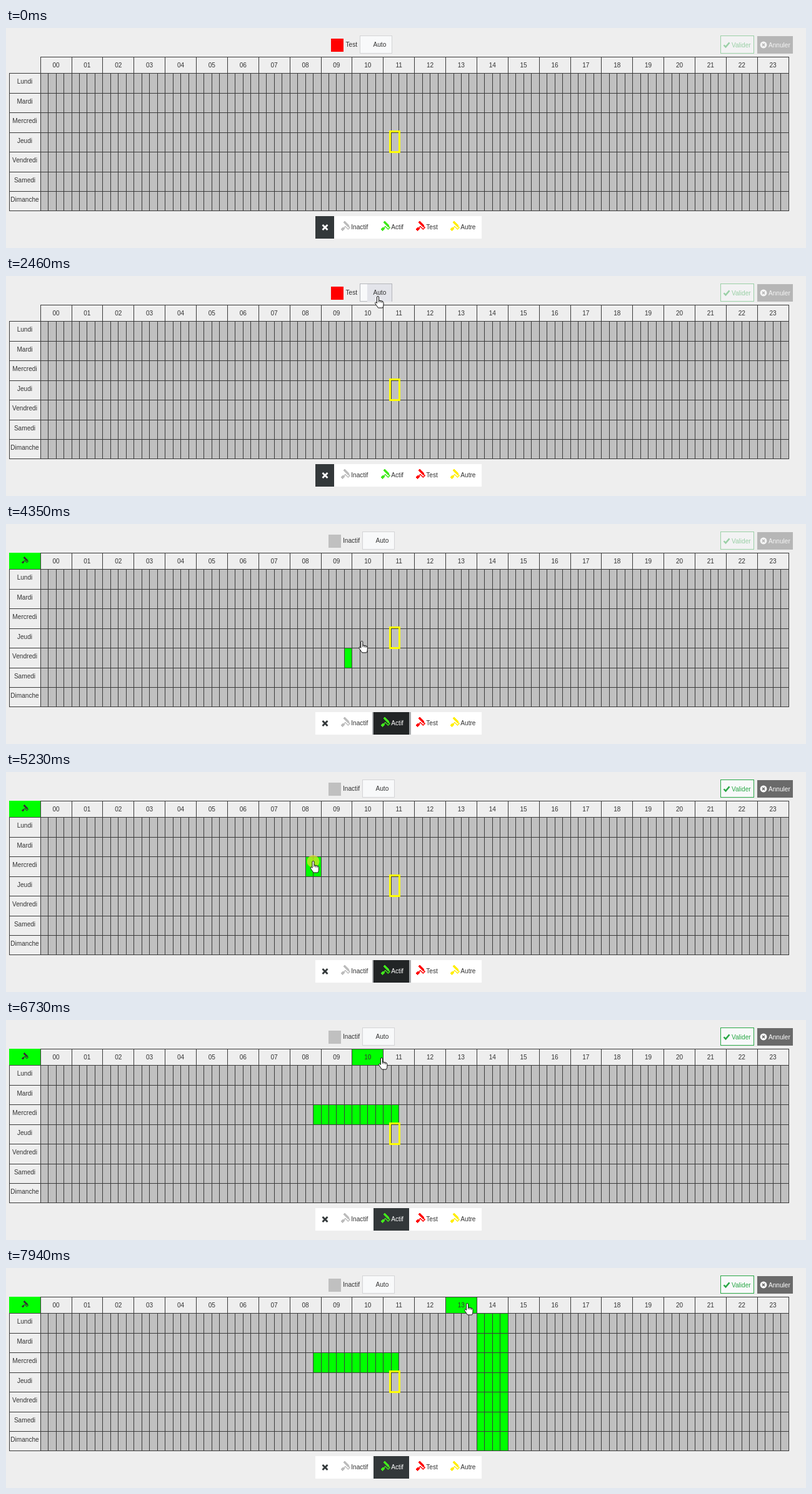
An HTML page for the animation above (8 s loop, 1280 by 352 pixels).

```html
<!DOCTYPE html>
<html lang="fr">
<head>
<meta charset="utf-8">
<title>Agenda</title>
<style>
html, body { margin: 0; width: 100%; height: 100%; overflow: hidden; background: #eee; }
svg { display: block; width: 1280px; height: 352px; }
text { font: 10.1px "Liberation Sans", Arial, sans-serif; fill: #333; }
.mid { text-anchor: middle; }
rect { shape-rendering: crispEdges; }
</style>
</head>
<body>
<svg viewBox="0 0 1280 352">
  <defs>
    <g id="brush" transform="rotate(45) scale(.028) translate(-256 -256)">
      <rect width="400" height="140" rx="32"/>
      <path d="M390 70H480V210H256V320" fill="none" stroke="currentColor" stroke-width="54"/>
      <rect x="186" y="310" width="140" height="200" rx="32"/>
    </g>
  </defs>
  <rect width="1280" height="352" fill="#eee"/>

  <g id="mode">
    <rect id="swatch" x="520" y="17" width="20" height="21"/>
    <text id="modeName" x="543.5" y="30"></text>
    <rect id="auto" x="566.5" y="12.5" width="51" height="28" fill="#f8f9fa"/>
    <rect id="autoHover" x="578" y="13" width="39" height="28" fill="#e3e4ea"/>
    <text x="587.5" y="30">Auto</text>
  </g>

  <g id="actions">
    <rect x="1143.5" y="12.5" width="53" height="28" fill="#f8f9fa" stroke="#28a745"/>
    <path d="M1148.5 27.2l3 3.2 6-7" fill="none" stroke="#28a745" stroke-width="2.4"/>
    <text x="1161" y="31.3" style="fill:#28a745">Valider</text>
    <rect x="1202" y="13" width="57" height="28" fill="#6a6a6a"/>
    <circle cx="1212" cy="27" r="5.4" fill="#fff"/>
    <path d="M1210 25l4 4m0-4l-4 4" stroke="#6a6a6a" stroke-width="1.7"/>
    <text x="1220" y="31.3" style="fill:#fff">Annuler</text>
  </g>

  <rect x="55" y="72" width="1197" height="220" fill="#c0c0c0"/>
  <g fill="#0f0">
    <rect id="column" y="72" height="220"/>
    <rect id="range" y="135" height="32"/>
    <rect id="hover"/>
    <rect id="corner" x="5" y="46" width="50" height="26"/>
  </g>
  <g id="cornerIcon" fill="#333" color="#333"><use href="#brush" transform="translate(29.5 59) scale(.72)"/></g>
  <path id="lines" fill="none" stroke="#3a3a3a" shape-rendering="crispEdges"/>
  <g id="labels"></g>
  <rect x="614.5" y="165.5" width="15" height="33" fill="none" stroke="#ff0" stroke-width="3"/>

  <rect x="495" y="301" width="266" height="36" fill="#fff"/>
  <rect id="ring" x="586" y="301" width="62" height="36" fill="#a8abad"/>
  <rect id="closeBg" x="495" y="301" width="30" height="36"/>
  <rect id="itemHover" y="301" height="36" fill="#f8f8f8"/>
  <rect id="activeBg" x="588" y="301" width="57" height="36"/>
  <path id="closeX" d="M506.5 315l8 8m0-8l-8 8" stroke-width="2.8"/>
  <g id="items"></g>

  <circle id="press" r="10" fill="#e6e22c" opacity=".7"/>
  <g id="pointer" stroke="#111" stroke-linejoin="round" fill="#fff">
    <g id="hand" transform="translate(-5 0)">
      <path d="M3.5 2a1.5 1.5 0 0 1 3 0V7L12 8.2Q14 8.8 14 11V14Q14 17 12.5 19H5.5L1 12.5Q0 10.2 1.7 9.8L3.5 11.5Z"/>
      <path d="M6.5 6.5V10M9 7.8V10.5M11.5 8.3V11" fill="none" stroke-width=".9"/>
    </g>
    <path id="arrow" d="M.5.5V16L4 12.7 6.4 18.3 8.9 17.2 6.5 11.8H11.3Z"/>
  </g>
</svg>
<script>
const $ = id => document.getElementById(id);
const set = (id, attrs) => { for (const k in attrs) $(id).setAttribute(k, attrs[k]); };
const show = (id, on) => { $(id).style.display = on ? '' : 'none'; };
const colX = i => Math.floor(55.15 + i * 12.469);
const rowY = [72, 104, 135, 167, 198, 230, 261, 292];
const days = ['Lundi', 'Mardi', 'Mercredi', 'Jeudi', 'Vendredi', 'Samedi', 'Dimanche'];
const items = [
  { name: 'Inactif', x: 525, end: 588, icon: 542, color: '#bdbdbd' },
  { name: 'Actif', x: 588, end: 645, icon: 606, color: '#42e81c' },
  { name: 'Test', x: 645, end: 700, icon: 662, color: '#f00' },
  { name: 'Autre', x: 700, end: 761, icon: 717, color: '#ffee0a' }
];

// Static parts
let d = 'M55 46.5H1253M5.5 72V293';
for (let i = 0; i <= 96; i++) d += `M${colX(i) + .5} ${i % 4 ? 72 : 46}V293`;
for (const y of rowY) d += `M5 ${y + .5}H1253`;
set('lines', { d });

let labels = days.map((name, i) => `<text class="mid" x="30" y="${rowY[i] + 17.3}">${name}</text>`).join('');
for (let h = 0; h < 24; h++)
  labels += `<text class="mid" x="${80 + h * 49.875}" y="62.5">${String(h).padStart(2, '0')}</text>`;
$('labels').innerHTML = labels;

$('items').innerHTML = items.map(({ name, icon, color }) =>
  `<g fill="${color}" color="${color}"><use href="#brush" x="0" transform="translate(${icon} 318.5)"/></g>
   <text id="item${name}" x="${icon + 10.3}" y="322">${name}</text>`).join('');

// Pointer path: time, x, y
const path = [
  [500, 413, 310], [620, 419, 311], [1160, 419, 311], [1400, 550, 317], [1560, 612, 312],
  [1770, 620, 150], [1910, 602, 42], [2180, 595, 32], [2560, 595, 32], [2900, 608, 180],
  [3130, 620, 332], [3270, 620, 327], [3400, 619, 319], [3600, 619, 319], [3800, 585, 285],
  [4020, 546, 208], [4090, 546, 208], [4280, 551, 201], [4350, 570, 187], [4620, 388, 150],
  [4700, 386, 146], [4890, 487, 143], [4960, 491.5, 142], [5270, 491.5, 142], [5800, 613, 147],
  [5920, 622, 145], [6190, 622, 145], [6450, 612, 100], [6640, 600, 62], [6730, 600, 60],
  [6870, 725, 60], [6940, 753, 60], [7010, 770, 58], [7070, 776, 58], [7560, 776, 58],
  [7800, 750, 57], [7940, 738, 56]
];
const presses = [[2530, 2600], [3470, 3540], [5230, 5920], [7410, 7540]];

function at(t) {
  const i = path.findIndex(p => p[0] > t);
  if (i === 0) return path[0].slice(1);
  if (i < 0) return path[path.length - 1].slice(1);
  const [t0, x0, y0] = path[i - 1], [t1, x1, y1] = path[i];
  const k = (t - t0) / (t1 - t0);
  return [x0 + (x1 - x0) * k, y0 + (y1 - y0) * k];
}

function draw(t) {
  const [x, y] = at(t);
  const [hx, hy] = at(t - 70); // hover trails the pointer
  const seen = t >= 500, toggled = t >= 2530, brush = t >= 3470, painted = t >= 5230;
  const cell = Math.floor((hx - 55.15) / 12.469);

  set('swatch', { fill: toggled ? '#c0c0c0' : '#f00' });
  set('mode', { transform: `translate(${toggled ? 4 : 0} 0)` });
  set('swatch', { x: toggled ? 512 : 520 });
  set('modeName', { x: toggled ? 535 : 543.5 });
  $('modeName').textContent = toggled ? 'Inactif' : 'Test';
  const onAuto = seen && y < 41 && x > 566 && x < 622;
  show('autoHover', onAuto);
  set('auto', { stroke: onAuto ? '#b4b6bb' : '#d3d4d6' });
  set('actions', { opacity: painted ? 1 : .42 });

  // Planning grid
  show('corner', brush);
  show('cornerIcon', brush);
  const inGrid = hx > 55 && hy > 46 && hy < 292;
  show('hover', brush && inGrid);
  if (inGrid) {
    const row = rowY.findLastIndex(v => v <= hy);
    const from = row < 0 ? cell - cell % 4 : cell, to = row < 0 ? from + 4 : cell + 1;
    const top = row < 0 ? 46 : rowY[row], bottom = row < 0 ? 72 : rowY[row + 1];
    set('hover', { x: colX(from), y: top, width: colX(to) - colX(from), height: bottom - top });
  }
  show('range', painted);
  const last = t < 5920 ? Math.min(45, Math.max(35, cell)) : 45;
  set('range', { x: colX(35), width: colX(last + 1) - colX(35) });
  show('column', t >= 7410);
  set('column', { x: colX(56), width: colX(60) - colX(56) });

  // Brush palette
  const focused = brush && t < 5320;
  show('ring', focused);
  show('activeBg', brush);
  set('activeBg', { fill: focused ? '#222526' : '#33383a' });
  set('closeBg', { fill: brush ? '#fff' : '#33383a' });
  set('closeX', { stroke: brush ? '#33383a' : '#fff' });
  $('itemActif').style.fill = brush ? '#fff' : '#333';
  const over = seen && hy >= 301 && hy < 337 && items.find(i => hx >= i.x && hx < i.end);
  show('itemHover', over);
  if (over) set('itemHover', { x: over.x, width: over.end - over.x });

  // Pointer
  const overItem = y >= 301 && y < 337 && x >= 495 && x < 761;
  const hand = onAuto || overItem || brush && y > 46 && y < 292;
  show('pointer', seen);
  show('hand', hand);
  show('arrow', !hand);
  set('pointer', { transform: `translate(${x} ${y})` });
  show('press', presses.some(([a, b]) => t >= a && t < b));
  set('press', { cx: x, cy: y + 1 });
}

const start = performance.now();
function tick() {
  draw((performance.now() - start) % 8000);
  requestAnimationFrame(tick);
}
tick();
</script>
</body>
</html>
```
